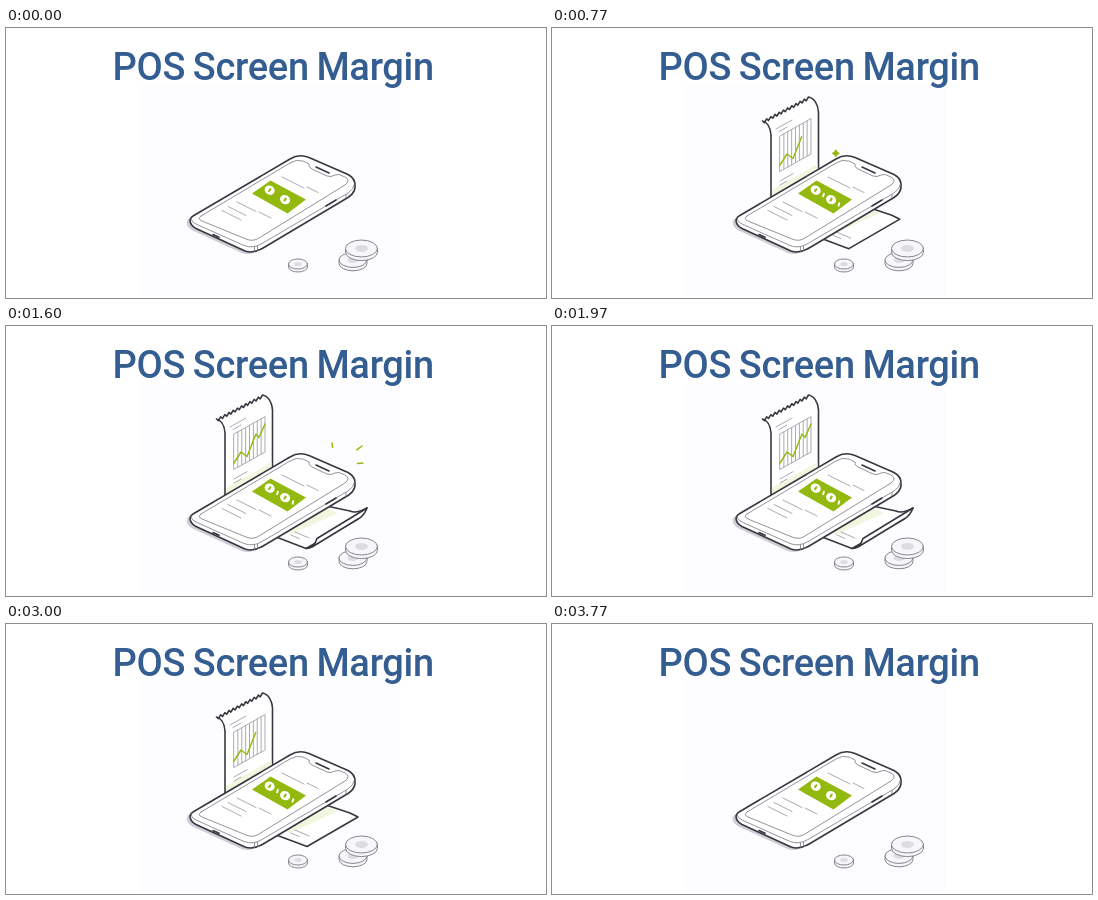
Animation of 540 by 270 pixels, one loop 3810 ms. Source, as an HTML page:

```html
<!DOCTYPE html>
<html lang="en">
<head>
<meta charset="utf-8">
<title>POS Screen Margin</title>
<style>
  html, body { margin: 0; width: 100%; height: 100%; overflow: hidden; background: #fff; }
  svg { display: block; width: 540px; height: 270px; }
  svg * { stroke-linecap: round; stroke-linejoin: round; }
  .title { font: 500 38px Roboto, sans-serif; letter-spacing: -.3px; word-spacing: -1.5px; fill: #345d92; }
  .ink { fill: #fff; stroke: #363740; stroke-width: 1.6; }
  .thin { fill: none; stroke: #777882; stroke-width: .8; }
  .text { fill: none; stroke: #a9aab3; stroke-width: 1; }
  .lime { fill: none; stroke: #93bb12; stroke-width: 1.5; }
  .coin { fill: #f7f7fa; stroke: #85868f; stroke-width: 1; }
  .green { fill: #93b90f; }
  .pale { fill: #f1f6df; }
</style>
</head>
<body>
<svg viewBox="0 0 540 270">
  <defs>
    <clipPath id="slot"><path d="M187 50V189L300 122.6V50Z"/></clipPath>
    <path id="body" d="M187 188L284 131Q293 125.500 303 129.500L342 146.500Q349.500 150.500 349 158V160Q348 165.500 342 169.500L258 219.500Q248 226 239 223L190 200.500Q184 197.500 184 192Q185 189 187 188Z"/>
  </defs>
  <rect x="133" y="57" width="261" height="213" fill="#fdfdff"/>
  <text class="title" x="106.500" y="51.500">POS Screen Margin</text>

  <g clip-path="url(#slot)">
    <g id="receipt">
      <path id="sheet" class="ink"/>
      <path class="pale" d="M220 162L265.500 136V150L220 178Z"/>
      <path id="print" class="text"/>
      <path id="trend" class="lime" pathLength="1" d="M228 137L235 126L241 130.500L250 108L253 111.500L259 98"/>
    </g>
  </g>

  <g id="paper">
    <path id="page" class="ink"/>
    <path class="pale" d="M276 205L284 209L332 187L318 181Z"/>
    <path class="text" d="M289 206L303 212M285 209L293 212.500"/>
    <path id="flap" class="ink"/>
  </g>

  <use href="#body" x="-3.400" y="2" fill="#cdced6"/>
  <use href="#body" class="ink"/>
  <path class="thin" d="M185 191Q185 194 191 196.500L238 217.500Q247 221 256 215.500L342 165Q348 161 348.500 156M248.500 219V223.500M251.500 218V222.500M340 166.500V170"/>
  <path class="thin" d="M195 188L284 135Q290 131 297 133L303 136Q302 139 306 141L321 148Q325 149.500 329 147L333 146.500L339 149Q345 152.500 339 157L253 210Q247 214 240 211L196 193Q191 191 195 188Z"/>
  <path class="ink" d="M310 139L323 145M207 206.500L213 209.300M320 178L330 172"/>
  <path id="lines" class="text"/>
  <path class="green" d="M264.500 152.500L300 171.500L281.500 185.500L246 165.500Z"/>
  <g id="icons"></g>
  <g id="coins"></g>
  <path id="rays" class="lime"/>
  <path id="starA" class="green"/>
  <path id="starB" class="green"/>
</svg>
<script>
const LOOP = 3810;
const $ = id => document.getElementById(id);
const set = (el, attrs) => { for (const k in attrs) el.setAttribute(k, attrs[k]); return el; };
const add = (parent, tag, attrs) =>
  parent.appendChild(set(document.createElementNS('http://www.w3.org/2000/svg', tag), attrs));
const show = (el, on) => set(el, { visibility: on ? 'visible' : 'hidden' });
const mix = (a, b, k) => a + (b - a) * k;
const ramp = (t, a, b) => Math.min(1, Math.max(0, (t - a) / (b - a)));
const ease = (t, a, b) => { const k = ramp(t, a, b); return k * k * (3 - 2 * k); };
// Rises from a to b and falls from c to d.
const pulse = (f, t, a, b, c, d) => f(t, a, b) - f(t, c, d);

function drawReceipt() {
  const teeth = 11, dx = 46 / teeth, dy = -24 / teeth;
  const edge = 'M210.5 93' + `l${dx * .45} ${dy * .45 + 2.6}l${dx * .55} ${dy * .55 - 2.6}`.repeat(teeth);
  set($('sheet'), { d: edge + 'C262 70 266 76 266.500 84V185H219V107C218.500 98 214 94 210.500 93' });

  const slope = -.56, bars = 8, step = 31 / bars;
  let print = 'M228 108L259 90.600V126L228 143.400Z';
  for (let i = 1; i < bars; i++) print += `M${228 + i * step} ${108 + i * step * slope}v35.400`;
  for (const [x, y, w] of [[224, 101, 16], [227, 103.5, 8], [228, 153, 13], [228, 157, 7]])
    print += `M${x} ${y}l${w} ${w * slope}`;
  set($('print'), { d: print });
}

function drawScreen() {
  const rows = [[276, 149, 22], [301, 159, 11], [231, 174, 19], [253, 184, 12], [222, 178.5, 18], [216, 182.5, 19]];
  set($('lines'), { d: rows.map(([x, y, w]) => `M${x} ${y}l${w} ${w / 2}`).join('') });

  return [0, 1].map(i => {
    const g = add($('icons'), 'g', { transform: `translate(${263.7 + 15.4 * i} ${162.2 + 9.4 * i})` });
    add(g, 'ellipse', { rx: 5.2, ry: 4.5, fill: '#fff', transform: 'rotate(30)' });
    add(g, 'ellipse', { rx: 2.3, ry: 1.1, class: 'green', transform: 'rotate(-55)' });
    return add(g, 'path', { d: 'M8.200 3.500l-.8 2.600', stroke: '#fff', 'stroke-width': 1.9 });
  });
}

function coin(x, y, r) {
  const g = $('coins'), ry = r * .53, depth = 2 + r * .1;
  add(g, 'path', { class: 'coin', d: `M${x - r} ${y}v${depth}a${r} ${ry} 0 0 0 ${2 * r} 0v${-depth}Z` });
  add(g, 'ellipse', { class: 'coin', cx: x, cy: y, rx: r, ry });
  add(g, 'ellipse', { cx: x, cy: y, rx: r * .4, ry: ry * .4, fill: '#dcdde2' });
}

function star(el, x, y, r) {
  const q = r * .28;
  show(el, r > .1);
  set(el, {
    d: `M0 ${-r}Q${q} ${-q} ${r} 0Q${q} ${q} 0 ${r}Q${-q} ${q} ${-r} 0Q${-q} ${-q} 0 ${-r}Z`,
    transform: `translate(${x} ${y})`
  });
}

function drawPaper(t) {
  const slide = pulse(ease, t, 560, 830, 3030, 3230);
  const curl = pulse(ease, t, 790, 1090, 2350, 2980);
  show($('paper'), slide > 0);
  set($('paper'), { transform: `translate(${-34 * (1 - slide)} ${-15 * (1 - slide)})` });

  const ax = 301 - curl, ay = 222.5, bx = 352, by = 193;
  const cx = bx + 9 * curl, cy = by - 11 * curl;
  set($('page'), { d: `M265 209L${ax} ${ay}L${bx} ${by}L${cx} ${cy}Q${bx - 2 * curl} ${by - 5 * curl} ${bx - 8} ${by - 4 - 4 * curl}L311 178Z` });
  set($('flap'), {
    d: `M${ax} ${ay}Q${ax + 8 * curl} ${ay} ${ax + 11 * curl} ${ay - 10 * curl}` +
       `L${cx} ${cy}Q${bx + 6 * curl} ${by - 3 * curl} ${bx} ${by}L${ax + 6 * curl} ${ay - 1.5 * curl}Z`,
    opacity: ramp(curl, 0, .2)
  });
}

function drawRays(t) {
  const head = ramp(t, 940, 1500), tail = ramp(t, 1000, 1800);
  const ends = [[326, 117], [356, 120], [357, 137]];
  const point = ([x, y], k) => `${mix(329, x, k)} ${mix(139, y, k)}`;
  show($('rays'), head > tail);
  set($('rays'), { d: ends.map(p => `M${point(p, mix(.2, 1, tail))}L${point(p, mix(.2, 1, head))}`).join('') });
}

function render(t) {
  const lift = pulse(ease, t, 20, 520, 3260, 3740);
  set($('receipt'), { transform: `translate(0 ${84 * (1 - lift)})` });

  const drawn = pulse(ramp, t, 600, 850, 2920, 3180);
  show($('trend'), drawn > 0);
  set($('trend'), { 'stroke-dasharray': `${drawn} 2` });

  const tick = pulse(ease, t, 100, 480, 3300, 3650);
  ticks.forEach(el => set(el, { opacity: tick }));

  drawPaper(t);
  drawRays(t);

  const rise = ramp(t, 640, 1300);
  star($('starA'), mix(281, 295, rise), mix(142, 58, rise), 5.2 * pulse(ramp, t, 640, 800, 1150, 1420));
  const drift = ease(t, 800, 1080);
  star($('starB'), mix(212, 201.5, drift), mix(135, 116.5, drift), 5.2 * pulse(ramp, t, 800, 1000, 1150, 1420));
}

drawReceipt();
const ticks = drawScreen();
coin(292, 236, 9.5);
coin(347, 232, 14);
coin(355.5, 220.5, 16);

(function frame() {
  render(performance.now() % LOOP);
  requestAnimationFrame(frame);
})();
</script>
</body>
</html>
```
